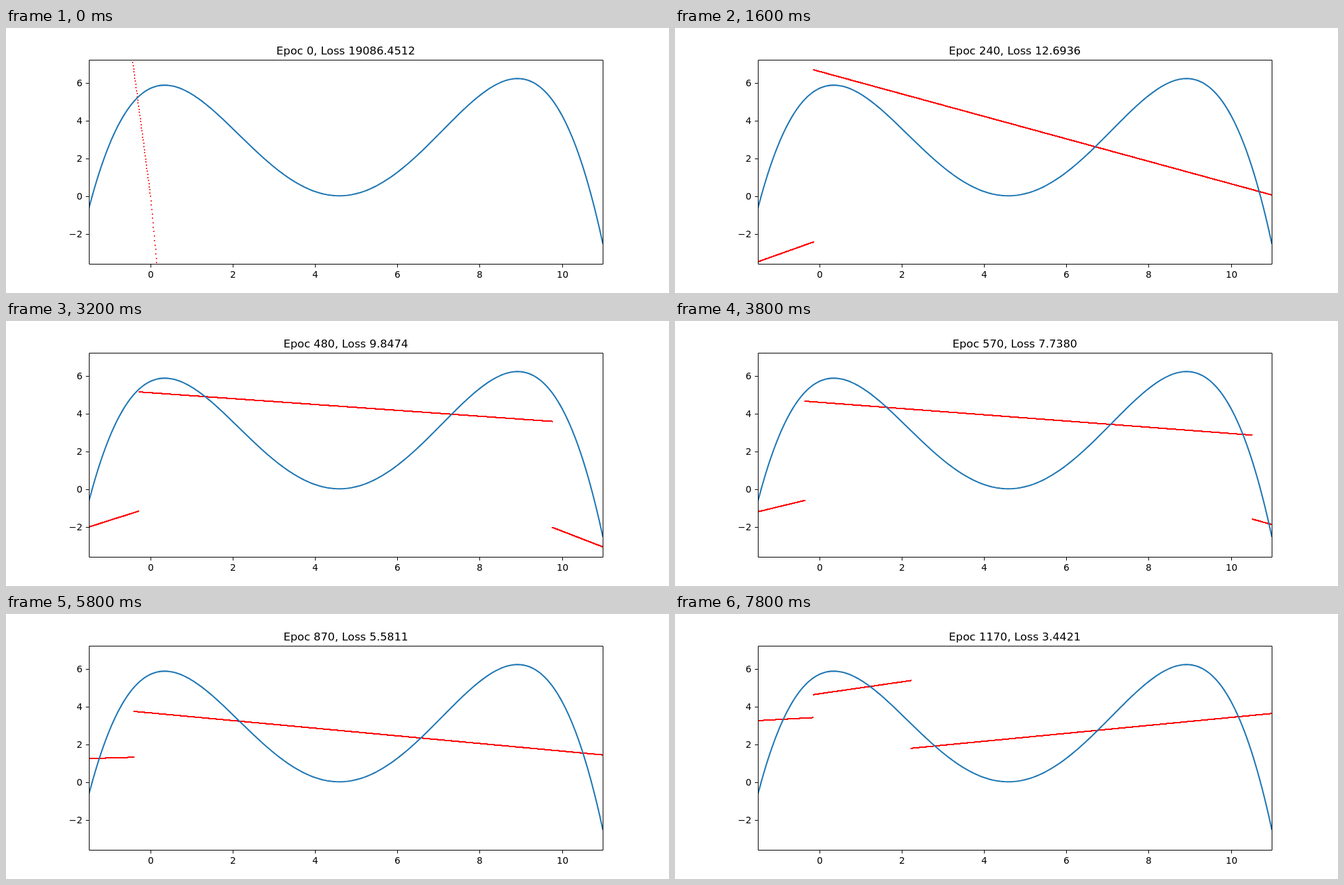
Recreate the animation shown at these times as an HTML page with a canvas. Size 1000 by 400 pixels, loop 8000 ms.

```html
<!DOCTYPE html>
<html>
<head>
<meta charset="utf-8">
<style>
  html, body { margin: 0; width: 100%; height: 100%; overflow: hidden; background: #fff; }
  canvas, body > svg { position: absolute; left: 0; top: 0; }
  text { font: 13.89px "DejaVu Sans", sans-serif; }
  #title { font-size: 16.67px; text-anchor: middle; }
  .x { text-anchor: middle; }
  .y { text-anchor: end; }
</style>
</head>
<body>
<canvas id="dots" width="1000" height="400"></canvas>
<svg width="1000" height="400">
  <svg x="125" y="48" width="775" height="308" viewBox="125 48 775 308">
    <path id="curve" fill="none" stroke="#1f77b4" stroke-width="2.08" stroke-linecap="square"/>
  </svg>
  <path id="axes" fill="none" stroke="#000"/>
  <g id="labels"></g>
  <text id="title" x="512.5" y="40"></text>
</svg>
<script>
const $ = id => document.getElementById(id);
const LEFT = 125, TOP = 48, WIDTH = 775, HEIGHT = 308;
const X_MIN = -1.5, X_MAX = 10.99;
const STEP = 200, STEPS = 40, EPOCHS_PER_STEP = 30;
const px = x => LEFT + (x - X_MIN) * WIDTH / (X_MAX - X_MIN);
const py = y => 253.8 - y * 28.39;

function target(x) {
  const u = x - 4.58;
  return 0.02 + u * (-0.008 + u * (0.65812 + u * (0.00266 - 0.017892 * u)));
}

// Key states of the fit: three lines, each [intercept, slope], joined at two breaks
const keys = [
  { epoch: 0, loss: 19086.4512, breaks: [0, 5], lines: [[0, -16.5], [0, -23.6], [-30, -15]] },
  { epoch: 120, loss: 220.9469, breaks: [0, 5.11], lines: [[-0.55, 0.71], [12.6, -3.01], [-1, -3]] },
  { epoch: 330, loss: 11.4886, breaks: [-0.15, 11.2], lines: [[-2.385, 0.78], [6.42, -0.513], [5.9, -0.845]] },
  { epoch: 480, loss: 9.8474, breaks: [-0.29, 9.77], lines: [[-0.965, 0.7], [5.125, -0.156], [6.22, -0.845]] },
  { epoch: 690, loss: 5.611, breaks: [-0.44, 11.5], lines: [[0.33, 0.3], [3.94, -0.179], [3, -0.3]] },
  { epoch: 870, loss: 5.5811, breaks: [-0.4, 11.2], lines: [[1.35, 0.065], [3.68, -0.203], [-3.5, 0.4]] },
  { epoch: 1170, loss: 3.4421, breaks: [-0.15, 2.22], lines: [[3.45, 0.12], [4.7, 0.316], [1.33, 0.211]] }
];

const mix = (a, b, t) => Array.isArray(a) ? a.map((v, i) => mix(v, b[i], t)) : a + (b - a) * t;

// The fit settles quickly at first, then drifts steadily
function fitAt(epoch) {
  const i = Math.max(1, keys.findIndex(k => k.epoch >= epoch));
  const a = keys[i - 1], b = keys[i];
  const t = (epoch - a.epoch) / (b.epoch - a.epoch);
  const eased = epoch < 330 ? 1 - (1 - t) ** 4 : t;
  return {
    loss: a.loss * (b.loss / a.loss) ** eased,
    breaks: mix(a.breaks, b.breaks, eased),
    lines: mix(a.lines, b.lines, eased)
  };
}

const ctx = $("dots").getContext("2d");
ctx.fillStyle = "#f00";
ctx.beginPath();
ctx.rect(LEFT, TOP, WIDTH, HEIGHT);
ctx.clip();

function draw(step) {
  const epoch = step * EPOCHS_PER_STEP;
  const { loss, breaks, lines } = fitAt(epoch);
  $("title").textContent = `Epoc ${epoch}, Loss ${loss.toFixed(4)}`;
  ctx.clearRect(0, 0, 1000, 400);
  for (let i = 0; i < 1250; i++) {
    const x = X_MIN + i / 100;
    const [intercept, slope] = lines[breaks.filter(b => x >= b).length];
    ctx.beginPath();
    ctx.arc(Math.round(px(x)), Math.round(py(intercept + slope * x)), 1.04, 0, 7);
    ctx.fill();
  }
}

function drawChart() {
  const points = Array.from({ length: 251 }, (_, i) => mix(X_MIN, X_MAX, i / 250));
  let axes = `M${LEFT + 0.5} ${TOP + 0.5}h${WIDTH}v${HEIGHT}h${-WIDTH}z`, labels = "";
  for (let x = 0; x <= 10; x += 2) {
    axes += `M${Math.round(px(x)) + 0.5} 356.5v5`;
    labels += `<text class="x" x="${Math.round(px(x)) + 0.5}" y="377">${x}</text>`;
  }
  for (let y = -2; y <= 6; y += 2) {
    const row = Math.round(py(y));
    axes += `M125.5 ${row + 0.5}h-5`;
    labels += `<text class="y" x="115.3" y="${row + 5}">${y < 0 ? "−" + -y : y}</text>`;
  }
  $("curve").setAttribute("d", "M" + points.map(x => `${px(x)} ${py(target(x))}`).join("L"));
  $("axes").setAttribute("d", axes);
  $("labels").innerHTML = labels;
}

let shown = -1;
function tick() {
  const step = Math.floor(performance.now() / STEP) % STEPS;
  if (step !== shown) draw(shown = step);
  requestAnimationFrame(tick);
}

drawChart();
tick();
</script>
</body>
</html>
```
